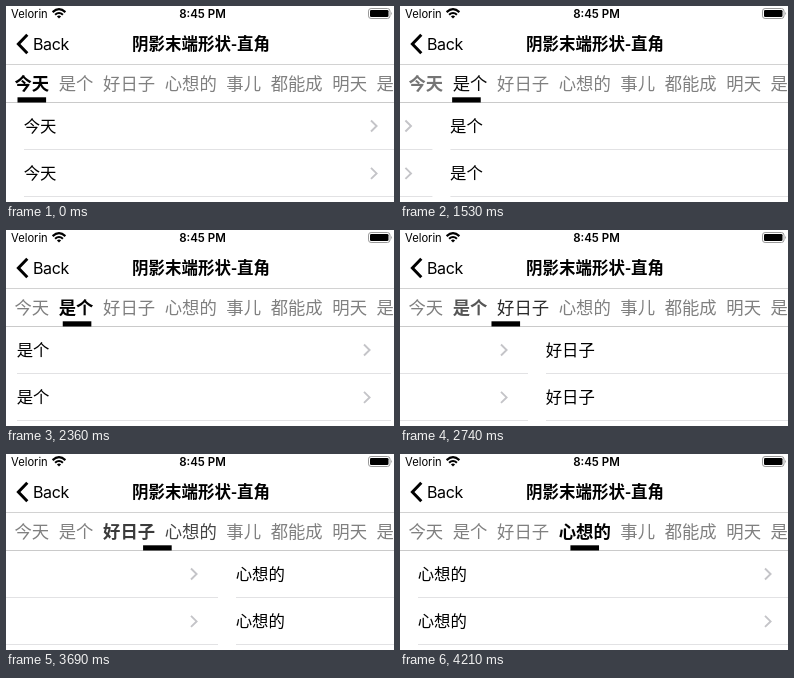
An HTML page for the animation above (5370 ms loop, 388 by 196 pixels).

```html
<!DOCTYPE html>
<html lang="zh-CN">
<head>
<meta charset="utf-8">
<title>Tab pager</title>
<style>
  html, body { margin: 0; width: 100%; height: 100%; overflow: hidden; background: #fff; }
  svg { display: block; width: 100vw; height: 100vh; }
  text { font-family: "Noto Sans CJK SC", "Noto Sans CJK", sans-serif; white-space: pre; }
  .ui { font-family: Inter, sans-serif; }
  .line { fill: none; stroke-linecap: butt; }
</style>
</head>
<body>
<svg viewBox="0 0 388 196" preserveAspectRatio="xMidYMid meet">
  <rect width="388" height="196" fill="#fff"/>
  <g id="pages"></g>

  <text class="ui" x="5" y="12" font-size="11.2">Velorin</text>
  <g class="line" stroke="#000" stroke-width="2.1">
    <path d="M46.6 6.1Q53 0.3 59.4 6.1"/>
    <path d="M49.1 8.8Q53 5.2 56.9 8.8"/>
  </g>
  <path d="M50.9 10.4Q53 8.8 55.1 10.4L53 12.6Z"/>
  <text class="ui" x="196.5" y="12" font-size="11.5" font-weight="600" text-anchor="middle">8:45 PM</text>
  <rect x="362.5" y="2.5" width="21.5" height="10" rx="2.6" fill="none" stroke="#999"/>
  <rect x="364" y="4" width="18.5" height="7" rx="1.3"/>
  <path d="M385.2 5.7Q387 7.5 385.2 9.3Z" fill="#999"/>

  <path class="line" d="M21.3 28.8L12.4 38L21.3 47.2" stroke="#000" stroke-width="3"/>
  <text class="ui" x="27" y="43.8" font-size="16" letter-spacing="-.4">Back</text>
  <text x="195" y="44.2" font-size="16.5" font-weight="700" text-anchor="middle">阴影末端形状-直角</text>
  <rect y="58" width="388" height="1" fill="#d2d2d2"/>

  <g id="tabs"></g>
  <rect y="96" width="388" height="1" fill="#cacaca"/>
  <rect id="bar" y="91.3" width="28.6" height="5.2"/>
</svg>
<script>
const LOOP = 5370, PAGE = 392, GRAY = 128;
const TITLES = ["今天", "是个", "好日子", "心想的", "事儿", "都能成", "明天", "是个"];
const EM = 17.35, GAP = 9.6;

// Each swipe: finger positions [ms, px], then a stepped glide to the next page.
const SWIPES = [
  { drag: [[1130, 7], [1190, 30]], from: 1420, to: 1730, steps: 8, left: 180 },
  { drag: [[2360, 7], [2400, 24], [2440, 54]], from: 2740, to: 3060, steps: 8, left: 128 },
  { drag: [[3570, 14], [3630, 84], [3690, 180]], from: 3920, to: 4210, steps: 7, left: 180 }
];

function add(parent, tag, attrs, content = "") {
  const el = document.createElementNS("http://www.w3.org/2000/svg", tag);
  for (const key in attrs) el.setAttribute(key, attrs[key]);
  el.textContent = content;
  return parent.appendChild(el);
}

const $ = id => document.getElementById(id);
const pages = $("pages"), bar = $("bar");

const centers = [];
let left = 8.45;
const tabs = TITLES.map(title => {
  const width = title.length * EM;
  const center = left + width / 2;
  centers.push(center);
  left += width + GAP;
  return add($("tabs"), "text", { x: center, y: 84.3, "font-size": EM, "text-anchor": "middle" }, title);
});

TITLES.slice(0, 4).forEach((title, i) => {
  const page = add(pages, "g", { transform: `translate(${i * PAGE})` });
  for (const y of [120, 167.4]) {
    add(page, "text", { x: 17.7, y: y + 6, "font-size": 16.4 }, title);
    add(page, "path", {
      class: "line", d: `M365 ${y - 5.5}l5.6 5.5l-5.6 5.5`, stroke: "#c4c4c8", "stroke-width": 1.9
    });
    add(page, "rect", { x: 18, y: Math.round(y + 23), width: PAGE - 18, height: 1, fill: "#e2e2e4" });
  }
});

function swipeOffset(s, t) {
  if (t >= s.to) return PAGE;
  if (t >= s.from) {
    const last = s.steps - 1;
    const k = Math.floor((t - s.from) / (s.to - s.from) * last);
    return PAGE - s.left * Math.exp(-6 * k / last);
  }
  return s.drag.reduce((x, [at, px]) => t >= at ? px : x, 0);
}

function render(t) {
  const offset = SWIPES.reduce((sum, s) => sum + swipeOffset(s, t), 0);
  const pos = offset / PAGE;
  const current = Math.floor(pos), part = pos - current;
  pages.setAttribute("transform", `translate(${-offset})`);
  const center = centers[current] + (centers[current + 1] - centers[current]) * part;
  bar.setAttribute("x", center - 14.3);
  tabs.forEach((tab, i) => {
    const shade = Math.round(GRAY * Math.min(1, Math.abs(i - pos)));
    tab.setAttribute("fill", `rgb(${shade},${shade},${shade})`);
    tab.setAttribute("font-weight", i === current ? 700 : 400);
  });
}

const start = performance.now();
function tick() {
  render((performance.now() - start) % LOOP);
  requestAnimationFrame(tick);
}
render(0);
requestAnimationFrame(tick);
</script>
</body>
</html>
```
